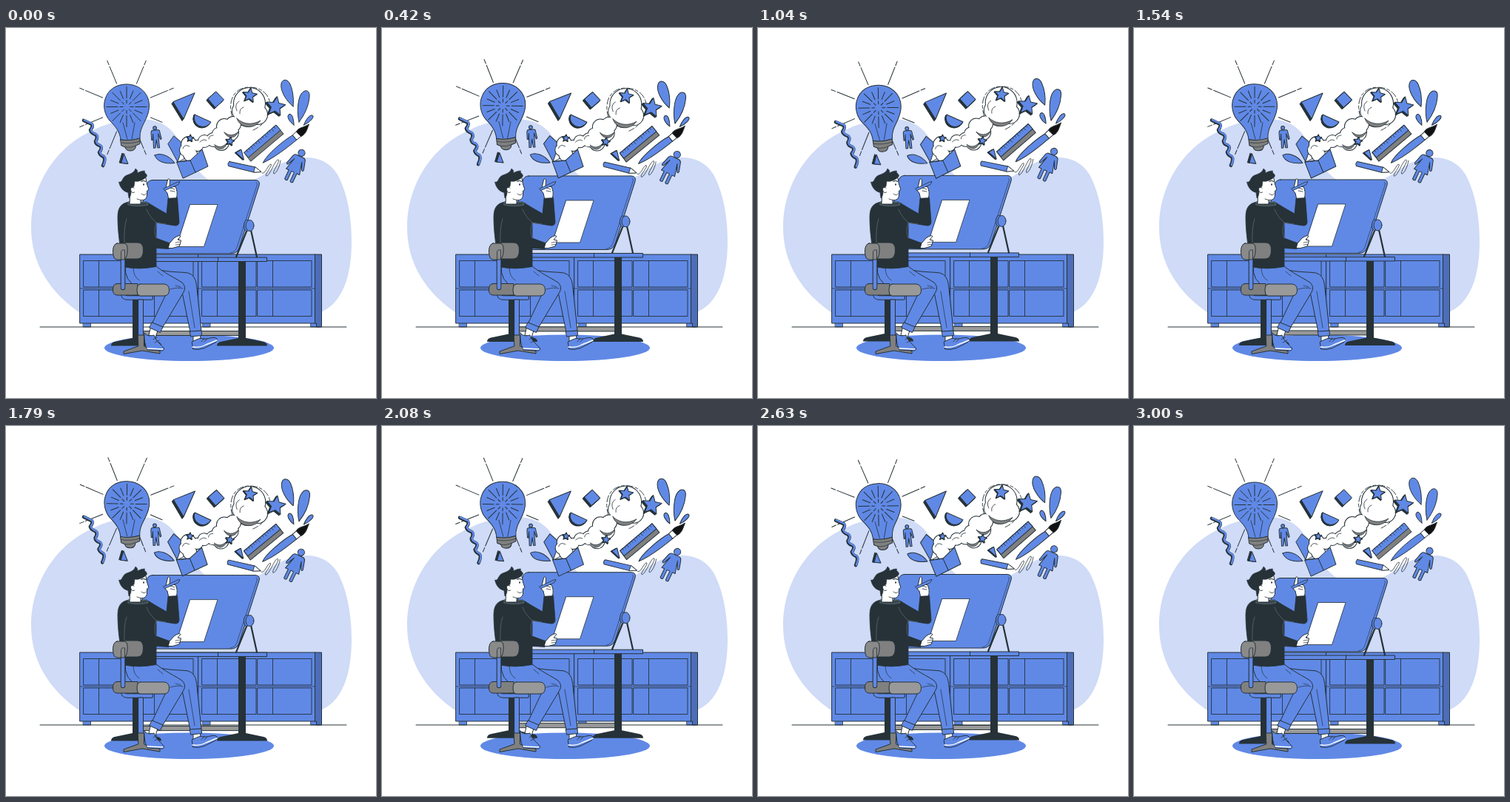
Write an HTML page with a canvas that moves like this. It is 500 by 500 pixels and loops after 3.04 s.

```html
<!DOCTYPE html>
<html lang="en">
<head>
<meta charset="utf-8">
<title>Designer at a drawing table</title>
<style>
html, body { margin: 0; width: 100%; height: 100%; overflow: hidden; background: #fff; }
canvas { display: block; width: 500px; height: 500px; }
</style>
</head>
<body>
<canvas id="stage"></canvas>
<script>
const BLUE = '#6089e6', SHADE = '#4d6eb8', PALE = '#cfdbf7', DARK = '#263238';
const GREY = '#999', DIM = '#808080', WHITE = '#fff';
const LOOP = 3040, FRAMES = 73, CYCLE = 1.5;

const canvas = document.getElementById('stage');
const ctx = canvas.getContext('2d');
const ratio = Math.max(1, window.devicePixelRatio || 1);
canvas.width = canvas.height = 500 * ratio;
ctx.lineJoin = ctx.lineCap = 'round';

const cache = new Map();
function path(d) {
  if (!cache.has(d)) cache.set(d, new Path2D(d));
  return cache.get(d);
}

function shape(d, fill = BLUE, line = DARK, width = 1) {
  const p = path(d);
  if (fill) { ctx.fillStyle = fill; ctx.fill(p); }
  if (line) { ctx.strokeStyle = line; ctx.lineWidth = width; ctx.stroke(p); }
}

const line = (d, width = 1, color = DARK) => shape(d, null, color, width);

function oval(x, y, rx, ry = rx, fill = BLUE, edge = DARK, width = 1) {
  ctx.beginPath();
  ctx.ellipse(x, y, rx, ry, 0, 0, Math.PI * 2);
  if (fill) { ctx.fillStyle = fill; ctx.fill(); }
  if (edge) { ctx.strokeStyle = edge; ctx.lineWidth = width; ctx.stroke(); }
}

function at(x, y, angle, draw) {
  ctx.save();
  ctx.translate(x, y);
  ctx.rotate(angle * Math.PI / 180);
  draw();
  ctx.restore();
}

// A flat shape with a dark side showing behind it
function solid(d, dx, dy) {
  at(dx, dy, 0, () => shape(d, DARK));
  at(dx / 2, dy / 2, 0, () => shape(d, DARK));
  shape(d);
}

function star(x, y, r, tilt, depth = 0) {
  let d = '';
  for (let i = 0; i < 10; i++) {
    const a = (i * 36 - 90) * Math.PI / 180, k = i % 2 ? r * 0.46 : r;
    d += (i ? 'L' : 'M') + (k * Math.cos(a)).toFixed(2) + ',' + (k * Math.sin(a)).toFixed(2);
  }
  at(x, y, tilt, () => solid(d + 'Z', -depth, depth));
}

function ray(x, y, angle, from, to, width = 1) {
  const c = Math.cos(angle), s = Math.sin(angle);
  ctx.beginPath();
  ctx.moveTo(x + c * from, y + s * from);
  ctx.lineTo(x + c * to, y + s * to);
  ctx.strokeStyle = DARK;
  ctx.lineWidth = width;
  ctx.stroke();
}

function cabinet(x, width) {
  shape(`M${x},306h${width}v93h${-width}Z`);
  for (const y of [314.5, 354]) {
    for (const dx of [5, 80]) {
      shape(`M${x + dx},${y}h73v35.5h-73Z`, BLUE, DARK, 0.9);
      line(`M${x + dx + 20.5},${y}v35.5`, 0.9);
    }
  }
  line(`M${x},352h${width}`, 0.7);
}

function room() {
  shape('M100,385C59,357 34,318 34,270C34,207 72,159 114,140C150,121 200,114 224,139C247,165 256,206 290,211C340,215 350,192 377,181C407,169 434,175 448,198C462,224 467,258 467,288C467,333 456,375 420,386Z', PALE, null);
  shape('M104.500,398h10v6h-10ZM266,398h10v6h-10ZM412,398h12v6h-12Z', BLUE, DARK, 0.8);
  shape('M417,306h9.500v98h-7v-5h-2.500Z', SHADE);
  cabinet(100, 160);
  cabinet(260, 157.5);
  line('M46,404H460');
  oval(247.5, 432.2, 114.5, 17.8, BLUE, null);
}

function tableLeg(x) {
  at(x, 0, 0, () => shape('M-5,314H5V419L29,424Q34,425 34,429.500H-34Q-34,425 -29,424L-5,419Z', DARK, null));
}

function table() {
  shape('M176,409.500H319V415.500H176Z', GREY);
  tableLeg(176);
  tableLeg(319);
  shape('M160,310H352.500V315.500H160Z');
  line('M286.500,310V315.500');
  shape('M198,205.500H337Q344,206 342,213L315,297.500Q312,305 304,305H170L190,212Q192,205.500 198,205.500Z');
  line('M338.500,209Q340,210 339,213L312,296.500Q309.500,303 303,304', 0.6);
  shape('M249,238.500H286L267.500,295.500H230.500Z', WHITE, DARK, 0.8);
  line('M326.500,271L311,309.500M330.500,271L339,309.500', 2.2);
  oval(325.5, 267, 4, 7.5);
  oval(329.5, 267, 5.5, 7.5);
}

function bulb() {
  for (let i = 0; i < 8; i++) {
    const a = (22.5 + i * 45) * Math.PI / 180;
    const end = i === 0 ? 52 : 68.5;
    ray(163, 107.5, a, 35, Math.min(60, end));
    if (end > 62) ray(163, 107.5, a, 62.5, end);
  }
  shape('M155,151C154,140 148,133 140,125C133,117 131,105 134,96C138,83 149,76 163,76C180,76 193.500,88 193.500,105C193.500,124 180,131 181,149Q167,154 155,151Z');
  for (let i = 0; i < 16; i++) {
    const a = i * Math.PI / 8;
    if (i % 2) {
      ray(163, 106.5, a, 12, 23);
    } else {
      ray(163, 106.5, a, 5, 9);
      ray(163, 106.5, a, 12, 27);
    }
  }
  line('M158,128L164,150M174,128L170,150', 0.8);
  shape('M155,151Q168,153 181,149L181,156.500L175.500,159Q175,166 168,166Q162,166 161,161L156,159Z', DIM);
  line('M156,155Q169,157 181,153M161,161Q169,162 175,159', 0.7);
}

const PUFFS = [
  [329, 102, 21], [318, 112, 12], [326, 119, 14], [340, 117, 13], [307, 130, 10], [295, 133, 10],
  [303, 141, 11], [287, 143, 8], [291, 155, 10], [280, 151, 9], [268, 153, 8], [259, 159, 7],
  [247, 157, 10], [243, 165, 8], [249, 171, 9]
];

function smoke() {
  ctx.setLineDash([9, 3, 4, 3]);
  line('M306,121C298,95 311,80 329,80C348,80 358,93 357,108C356,121 347,132 334,138', 0.9);
  ctx.setLineDash([]);
  for (const [x, y, r] of PUFFS) oval(x, y, r, r, null, DARK, 2);
  for (const [x, y, r] of PUFFS) oval(x, y, r, r, WHITE, null);
  shape('M312,122C316,136 335,138 344,125C334,131 321,131 312,122Z', DIM, DARK, 0.8);
  shape('M295,141C300,151 311,149 314,140C308,146 301,146 295,141ZM282,158C286,166 296,165 298,156C293,161 288,162 282,158Z', DIM, DARK, 0.8);
  line('M312,112Q308,103 315,99M316,116Q315,109 321,107M280,145Q274,145 274,150M262,154Q267,149 271,152M239,163Q241,156 248,160', 0.8);
}

function box() {
  shape('M227,146L240,157L232,181L219,157Z');
  shape('M232,181L240,157L264,164Z', WHITE, DARK, 0.8);
  smoke();
  shape('M231,181L249,179L265,164L273,187L239.500,203Z');
  line('M231,181L249,179L256,195');
}

function ruler() {
  shape('M322,168L365,131L375,143L331,180Z', DIM);
  shape('M322,168L365,131L371,138L327.500,175Z');
  for (let i = 1; i < 14; i++) {
    const x = 322 + i * 3.07, y = 168 - i * 2.64, k = i % 3 ? 2.5 : 4;
    line(`M${x},${y}l${k * 0.65},${k * 0.76}`, 0.8);
  }
}

function brush() {
  shape('M347.500,182C351,172 376,151 388,144.500L393,151C381,161 360,177 347.500,182Z');
  shape('M387.500,144.500L393,139.500L399,146L393,151Z', WHITE);
  shape('M392.500,140C395,134 402,135 409.500,130C407,136 406,143 399,146.500Z', '#111', DARK);
  shape('M388,106C378,98 370,84 372,75C374,68 381,69 384,76C388,85 389,97 388,106Z');
  shape('M396,127C393,115 394,96 399,89C404,82 411,84 410,93C409,106 403,118 396,127Z');
  shape('M389,131C383,127 379,120 382,117C386,114 389,122 389,131Z');
  shape('M402.500,131C405,124 410,117 414,118C418,120 410,128 402.500,131Z');
}

function figures() {
  at(203, 148, -4, () => {
    oval(-1, -13, 2.4);
    shape('M-4,-10H3Q5.500,-10 5.500,-6L7,2L5.500,3L3,-5L3.500,14H1L0,3L-2,14H-4.500L-4,-5L-5,3H-6.500L-6.500,-6Q-6.500,-10 -4,-10Z');
  });
  at(391, 187, 25, () => {
    oval(0, -20, 4.6);
    shape('M-5,-15H5Q8,-15 9,-12L12.500,0Q12,3 10,1L5.500,-9L10,8H6V21Q4,23 2,21V8H-2V21Q-4,23 -6,21V8H-10L-5.500,-9L-10,1Q-12,3 -12.500,0L-9,-12Q-8,-15 -5,-15Z');
  });
}

function ideas() {
  bulb();
  const zig = 'M105,125L116,130Q118,133 114,138Q115,142 121,144Q125,147 121,153Q121,157 127,159Q131,162 126,168Q127,172 132,174Q135,177 131,186';
  line(zig, 4.6);
  at(0.8, -0.5, 0, () => line(zig, 2.4, BLUE));
  solid('M159.500,170L165,183.500L156,182.500Z', -2.5, -0.5);
  solid('M255,88L240,123L226,100Z', -2, 2.5);
  solid('M284,86L294.500,97L283,107.500L273,96Z', -2, 2);
  solid('M255,117L277,127A12.100,12.100 0 0 1 255,117Z', -1.5, 1.5);
  solid('M318,164.500L321.500,178L311,168.500Z', -1.5, 0.5);
  shape('M201,172C208,168 221,172 228,182.500C215,184 204,181 201,172Z');
  box();
  star(329.5, 91, 10, 8, 0.8);
  star(364.5, 106, 13.5, 8, 1.8);
  star(249, 149, 5, 5, 0.5);
  star(303, 153, 6, 10, 0.8);
  ruler();
  brush();
  shape('M302,180.500L337,188L345,194.500L335,195L300.500,186.500Q299,182 302,180.500Z');
  shape('M337,188L345,194.500L335,195Z', WHITE, DARK, 0.8);
  line('M346,196C350,199 355,183 358,184C361,186 348,199 352,200C357,199 364,177 368,178C371,180 359,195 362,197C365,197 370,187 371,179', 0.8);
  figures();
}

function chairBase() {
  line('M158,301V358Q158,364.500 164,364.500H196', 6.4);
  line('M158,301V358Q158,364.500 164,364.500H196', 4.6, BLUE);
  shape('M179,367H185.500V416H179Z');
  shape('M178.500,415H186.500V430L208,436.500V440L184,436L159,440.500V437L178.500,430Z', DIM);
}

function legs() {
  shape('M253,412L253,424L263,421L262,411Z', WHITE);
  shape('M251.500,424C256,422 262,418 266,420C273,421 279,417 284,419Q287,421 283,425L268,432.500Q260,435.500 253,434Z');
  line('M252,431Q262,432.500 270,428L285,422', 1.4, WHITE);
  line('M264,424L268,419M268,424L272,420', 0.8);
  shape('M196,323C214,331 233,329 246,331Q256,334 257.500,347L264,409L249,411L237,352L205,345Z');
  shape('M248.500,410L264,409L264.500,415.500L250,417Z');
  shape('M196,402L193,415L202,418L206,406Z', WHITE);
  shape('M187,412C190,417 196,416 200,415C203,424 210,428 213.500,433Q214,436 210,436L191,435Q186,425 187,412Z');
  line('M191,433L212,434', 1.4, WHITE);
  line('M199,421L204,418M201,425L207,422', 0.8);
  shape('M161,321H202C212,330 229,338 238,344Q244,350 240,357L212,404L197,400L217,358L178,350Q160,343 161,321Z');
  shape('M197.500,398L212,404L208.500,411.500L194,405Z');
  line('M222,353Q232,350 239,352M229,348L236,350M172,324Q172,336 180,341M205,329L212,335M247,356L255,405', 0.7);
}

function head() {
  shape('M172,205C179,207 186,204 188.500,201L190.500,211L193,218.500L190.500,220L190.500,226C190,231 187,233 182,232.500L182,238H167L168,214Z', WHITE);
  shape('M168,223C158,222 154,215 152.500,208C157,210 157,202 162,199.500C168,197 173,196 175,190C178,192 178,194 177.500,196C181,194 184,193 187.500,193C186,196 190,196 190.500,200C186,206 179,208 174,207L173,214L170,216L168.500,226L166,230L165,223Z', DARK, DARK, 0.6);
  shape('M173,216Q168,214 168.500,219Q170,224 173.500,222', WHITE, DARK, 0.9);
  oval(186, 211.5, 0.9, 1.3, DARK, null);
  line('M183,207.500Q186,205.500 188.500,207.500', 1.1);
  line('M183,224Q186,227 189,224.500M177,231L182,232.500', 0.8);
}

function body() {
  shape('M166,235H190C198,240 210,247 217,251L219,230L231.500,229L234,262Q234,267.500 228,267L203,263L203,284L222,291L220,298.500L203,297.500V322.500Q180,327 160,323C154,300 151,275 151,256C151,243 155,237 166,235Z', DARK, DARK, 0.8);
  shape('M166,235Q178,238 190,234.500L192,239Q178,242 165,239Z', '#37464d', '#78858b', 0.6);
  line('M190,245Q193,254 203,263L216,265M160,290Q159,270 163,258M203,263Q199,275 203,284', 0.5, '#78858b');
  shape('M219.500,230L218,223Q213.500,219 216,216L218.500,205Q220.500,202 221.500,206L221,214L229,214.500Q232.500,221 230.500,229.500Z', WHITE);
  shape('M213,217L231,208.500L235,207.500L233,211.500L215,219.500Z', BLUE, DARK, 0.8);
  line('M222,216L228,218M222,220L228,221', 0.8);
  shape('M221,291L227,284Q234,279 236,281.500L232,286L236.500,287L235.500,291L234,295L225,297.500L219.500,297.500Z', WHITE);
  line('M229,290L235,289M229,293L235,292.500', 0.7);
}

function chairTop() {
  shape('M150,345.500H178V361H150Q144,360.500 144.500,353Q144.500,346 150,345.500Z', DIM);
  shape('M181,346H214Q220.500,347 220.500,354Q220.500,361.500 214,362H181Q177,361 177,354Q177,347 181,346Z', GREY);
  line('M158,304V351', 6.4);
  line('M158,304V351', 4.6, BLUE);
  shape('M160,290H178Q185.500,290 185.500,300Q185.500,311.500 178,312H160Z', DIM);
  shape('M150,291H160Q165,292 164,301Q164,311 159,313H150Q144.500,312.500 144.500,302Q144.500,292 150,291Z', '#8a8a8a');
  line('M155.500,313V303Q155.500,299 160.500,300V312', 0.8);
}

// Sway reaches +1 degree at a quarter of the cycle and -1 at three quarters
function sway(p) {
  return p < 0.25 ? p * 4 : p < 0.75 ? 2 - p * 4 : p * 4 - 4;
}

function render(ms) {
  const step = Math.floor((ms % LOOP) / LOOP * FRAMES + 0.1) % FRAMES;
  const p = (step / 24 / CYCLE) % 1;
  const lift = -10 * (1 - Math.abs(1 - 2 * p));
  ctx.setTransform(ratio, 0, 0, ratio, 0, 0);
  ctx.fillStyle = WHITE;
  ctx.fillRect(0, 0, 500, 500);
  room();
  at(0, lift, 0, table);
  at(256, 125, sway(p), () => { ctx.translate(-256, -125); ideas(); });
  chairBase();
  legs();
  body();
  head();
  chairTop();
}

const start = performance.now();
function tick() {
  render(performance.now() - start);
  requestAnimationFrame(tick);
}
tick();
</script>
</body>
</html>
```
